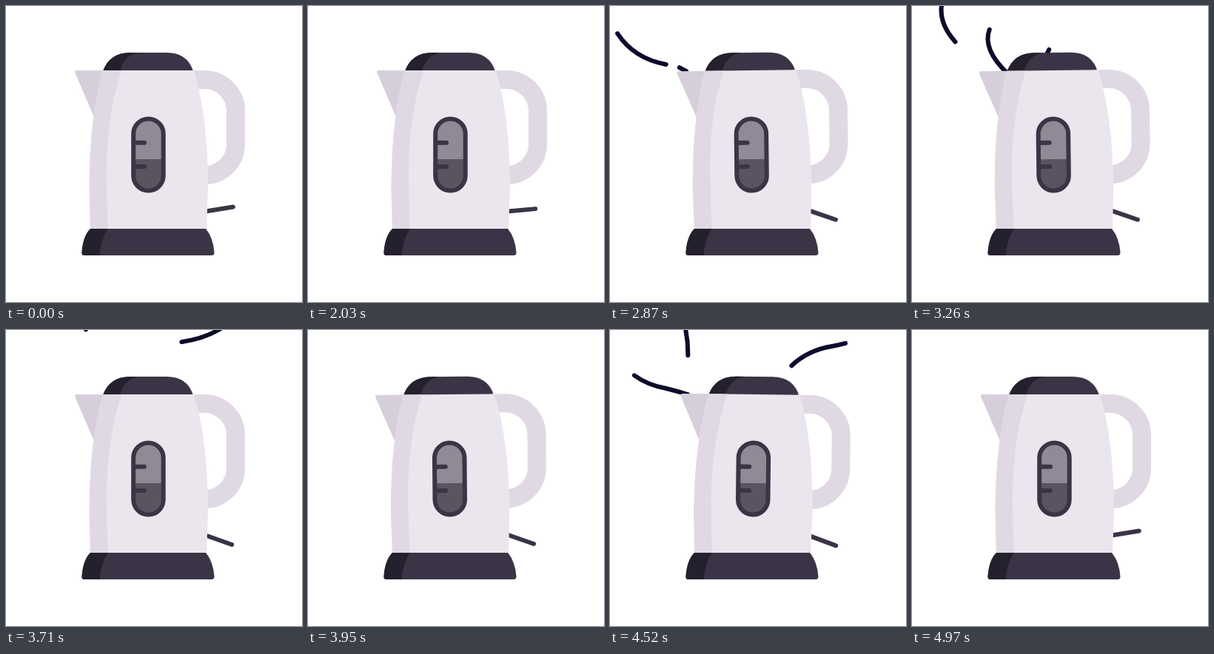
Write an HTML page that moves like this. It is 400 px wide and 400 px high and loops after 5.66 s.

```html
<!DOCTYPE html>
<html lang="en">
<head>
<meta charset="utf-8">
<title>Kettle</title>
<style>
html, body { margin: 0; width: 100%; height: 100%; overflow: hidden; background: #fff; }
svg { display: block; width: 100vw; height: 100vh; }
</style>
</head>
<body>
<svg viewBox="0 0 400 400">
  <g id="steam" fill="none" stroke="#0d0b2b" stroke-width="6" stroke-linecap="round"></g>
  <g id="body">
    <path id="lever" d="M270 277.5h37.3" stroke="#3b3446" stroke-width="6" stroke-linecap="round"/>
    <path d="M131 88Q140 63 168 63H217Q245 63 253 88z" fill="#3b3446"/>
    <path d="M131 88Q140 63 168 63H180Q160 66 154 88z" fill="#25202d"/>
    <path d="M250 99.5H268A42.5 42.5 0 0 1 310.5 142V187A42 42 0 0 1 268 228.7" fill="none" stroke="#e0d9e4" stroke-width="25"/>
    <path d="M96 87H131L119 150 94 92Q91.500 87 96 87z" fill="#d6cfdb"/>
    <path d="M131 87H254Q273 150 273 245L271 304H114L112.500 245Q113 150 131 87z" fill="#ebe6ed"/>
    <path d="M131 87H156Q136 150 136 225 136 265 138 304H114L112.500 245Q113 150 131 87z" fill="#e0d9e4"/>
    <rect x="172.200" y="152.500" width="40.500" height="97" rx="20.200" fill="#918a96"/>
    <path d="M172.200 207H212.700V229.300A20.200 20.200 0 0 1 172.200 229.300z" fill="#5a5461"/>
    <g fill="none" stroke="#3b3446" stroke-width="6" stroke-linecap="round">
      <rect x="172.200" y="152.500" width="40.500" height="97" rx="20.200"/>
      <path d="M173 184.800H187M173 217H187"/>
    </g>
  </g>
  <path d="M114 301H270Q280 313 281.500 333 281.500 337 278 337H106Q102 337 102.500 333 104 311 114 301z" fill="#3b3446"/>
  <path d="M114 301H138Q128 315 126.500 337H106Q102 337 102.500 333 104 311 114 301z" fill="#25202d"/>
</svg>
<script>
const LOOP = 5660, SPEED = 1 / 3;
const SWAY_START = 2604, SWAY_END = 4820, SWAYS = 6, SWAY_ANGLE = 0.7;
const OFF = -9.2, ON = 19.7, OVERSHOOT = 7.5;
const LEFT = "M105 87Q92 83 76 79 32 71 10 37 2 25-5 8";

// Each wisp: path, start time in ms, length
const wisps = [
  [LEFT, 2540, 80],
  ["M103 88Q75 75 60 50 28 16 46-20L50-30", 2840, 80],
  ["M130 92Q94 58 105 31 112 15 107-4", 3053, 117],
  ["M180 70Q200 22 238 16 266 12 287 0L310-15", 3224, 80],
  ["M122 95Q100 72 104 54 108 20 100-10", 4082, 80],
  ["M225 75Q250 30 300 22 345 14 367-10", 4180, 80],
  [LEFT, 4290, 80]
].map(([d, start, length]) => {
  const el = document.createElementNS("http://www.w3.org/2000/svg", "path");
  el.setAttribute("d", d);
  el.setAttribute("stroke-dasharray", length + " 9999");
  document.getElementById("steam").append(el);
  return { el, start, length };
});
const body = document.getElementById("body");
const lever = document.getElementById("lever");

function ease(t, start, duration) {
  const p = Math.min(1, Math.max(0, (t - start) / duration));
  return p * p * (3 - 2 * p);
}

// Swing past the goal, then settle back
function flip(t, start, by) {
  const extra = Math.sign(by) * OVERSHOOT;
  return (by + extra) * ease(t, start, 150) - extra * ease(t, start + 150, 180);
}

function draw(t) {
  const p = (t - SWAY_START) / (SWAY_END - SWAY_START);
  const sway = p > 0 && p < 1 ? SWAY_ANGLE * Math.sin(2 * Math.PI * SWAYS * p) : 0;
  body.setAttribute("transform", `rotate(${sway} 192 301)`);

  const angle = OFF + flip(t, 2000, ON - OFF) + flip(t, 4640, OFF - ON);
  lever.setAttribute("transform", `rotate(${angle} 270 277.5)`);

  for (const { el, start, length } of wisps) {
    const head = (t - start) * SPEED;
    el.style.display = head > 0 ? "" : "none";
    el.setAttribute("stroke-dashoffset", length - head);
  }
}

const begin = performance.now();
function tick() {
  draw((performance.now() - begin) % LOOP);
  requestAnimationFrame(tick);
}
tick();
</script>
</body>
</html>
```
